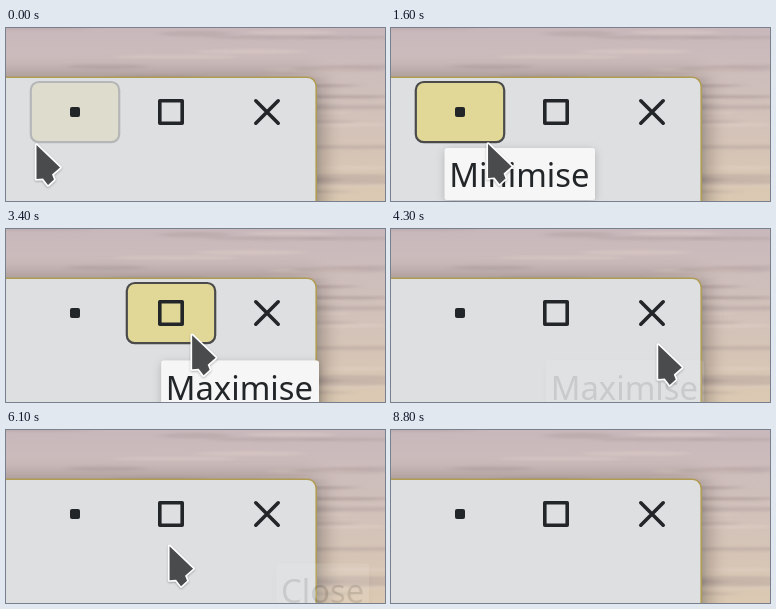
Animation of 379 by 173 pixels, one loop 9700 ms. Source, as an HTML page:

```html
<!DOCTYPE html>
<html lang="en">
<head>
<meta charset="utf-8">
<title>Window buttons</title>
<style>
  html, body { margin: 0; width: 100%; height: 100%; overflow: hidden; background: #cbbcbb; }
  svg { display: block; width: 100%; height: 100%; }
  text { font-family: "Noto Sans", "Open Sans", sans-serif; font-size: 32.8px; fill: #232629; }
</style>
</head>
<body>
<svg viewBox="0 0 379 173">
  <defs>
    <linearGradient id="sky" x1="0" y1="0" x2="0" y2="1">
      <stop offset="0" stop-color="#c8b8bc"/>
      <stop offset=".4" stop-color="#d0c0bb"/>
      <stop offset="1" stop-color="#dbc9b2"/>
    </linearGradient>
    <filter id="haze" x="-20%" y="-20%" width="140%" height="140%"><feGaussianBlur stdDeviation="5 1.2"/></filter>
    <filter id="soft" x="-30%" y="-50%" width="160%" height="200%"><feGaussianBlur stdDeviation="12"/></filter>
    <filter id="tipShadow" x="-20%" y="-40%" width="140%" height="180%">
      <feDropShadow dx="0" dy="2" stdDeviation="4" flood-color="#000" flood-opacity=".2"/>
    </filter>
    <filter id="cursorShadow" x="-50%" y="-50%" width="200%" height="200%">
      <feDropShadow dx="0" dy="1" stdDeviation="1" flood-color="#000" flood-opacity=".3"/>
    </filter>
  </defs>

  <rect width="379" height="173" fill="url(#sky)"/>
  <g id="streaks" filter="url(#haze)"></g>

  <rect x="-60" y="54" width="370" height="180" fill="#1c1614" opacity=".55" filter="url(#soft)"/>
  <rect x="-20" y="49.2" width="330.2" height="160" rx="9" fill="#dedfe1" stroke="#b09c52" stroke-width="1.6"/>

  <g id="buttons"></g>
  <g fill="none" stroke="#232629" stroke-width="3.6">
    <rect x="64" y="79" width="10" height="10" rx="2" fill="#232629" stroke="none"/>
    <rect x="153.8" y="72.8" width="22.4" height="22.4" stroke-linejoin="round"/>
    <path d="M249.8 72.8l22.4 22.4m0-22.4l-22.4 22.4" stroke-linecap="round"/>
  </g>
  <g id="tips"></g>
  <path id="cursor" d="M0 0V34L6.5 33.5L11.5 40L17.5 34.5L15.5 29.5L23.5 22.5Z" fill="#4a4c4e"
    stroke="#fff" stroke-width="3.2" stroke-linejoin="round" paint-order="stroke" filter="url(#cursorShadow)"/>
</svg>
<script>
const LOOP = 9700, STEP = 100, FALL = 300;
const YELLOW = '#e1d898', GOLD = '#e3d374', RED = '#e0858c';
const $ = id => document.getElementById(id);
const clamp = v => Math.min(1, Math.max(0, v));
const easeOut = p => 1 - (1 - p) ** 2;

function make(parent, tag, attrs) {
  const el = document.createElementNS('http://www.w3.org/2000/svg', tag);
  for (const key in attrs) el.setAttribute(key, attrs[key]);
  return parent.appendChild(el);
}

// Blurred streaks of the wallpaper
let seed = 7;
const random = () => (seed = seed * 16807 % 2147483647) / 2147483647;
for (let i = 0; i < 50; i++) {
  make($('streaks'), 'ellipse', {
    cx: random() * 379, cy: random() * 173, rx: 30 + random() * 50, ry: 1 + random() * 2,
    fill: i % 2 ? '#e4d5cc' : '#a99994', opacity: .35
  });
}

const faders = [];

// Fades in at `on` over `rise`, and out at `off`
function addFader(el, on, off, rise = 100) {
  faders.push({ el, on, off, rise });
}

function addButton(x, fill, on, off, rise) {
  const el = make($('buttons'), 'rect', {
    x, y: 54, width: 88.4, height: 60.2, rx: 8, fill, stroke: '#4a4a4b', 'stroke-width': 2.2
  });
  addFader(el, on, off, rise);
}

function addTip(label, x, y, width, on, off, rise) {
  const el = make($('tips'), 'g', {});
  make(el, 'rect', { x, y, width, height: 52, rx: 2.5, fill: '#f6f6f6', filter: 'url(#tipShadow)' });
  make(el, 'text', { x: x + 4.5, y: y + 39 }).textContent = label;
  addFader(el, on, off, rise);
}

addButton(24.8, YELLOW, -50, 1700, 350);
addButton(120.8, YELLOW, 2300, 3600);
addButton(216.8, RED, 4300, 5300);
addButton(120.8, GOLD, 6100, 8000, 300);

addTip('Minimise', 53.7, 120, 150.3, 800, 1900);
addTip('Maximise', 155.2, 131.5, 157.8, 2800, 4100);
addTip('Close', 270.5, 133.5, 92.5, 4300, 5900, 300);
addTip('Maximise', 166.2, 132.5, 157.8, 7100, 7300, 150);

// Each hop eases the pointer to a new rest; bow bends its path downwards
const rest = { x: 30.5, y: 117 };
const hops = [
  { from: 0, to: 800, x: 49, y: 98, bow: 0 },
  { from: 1300, to: 2400, x: 151, y: 109, bow: 17 },
  { from: 3100, to: 3500, x: 188.5, y: 109, bow: -4 },
  { from: 3600, to: 4400, x: 268.5, y: 111, bow: 13 },
  { from: 5200, to: 6200, x: 162.5, y: 111.5, bow: 15 },
  { from: 8000, to: 8500, x: 83, y: 122, bow: 0 },
  { from: 8600, to: 8700, x: 27, y: 115, bow: 0 }
];

function pointer(t) {
  let { x, y } = rest;
  for (const hop of hops) {
    const p = clamp((t - hop.from) / (hop.to - hop.from)), s = easeOut(p);
    x += (hop.x - x) * s;
    y += (hop.y - y) * s + hop.bow * Math.sin(Math.PI * p);
  }
  return { x, y };
}

function draw(time) {
  const t = Math.floor(time % LOOP / STEP) * STEP;
  for (const { el, on, off, rise } of faders) {
    const shown = easeOut(clamp((t - on) / rise)) * (1 - easeOut(clamp((t - off) / FALL)));
    el.setAttribute('opacity', shown);
  }
  const { x, y } = pointer(t);
  $('cursor').setAttribute('transform', `translate(${x} ${y})`);
  $('cursor').setAttribute('visibility', t < 8800 ? 'visible' : 'hidden');
}

const start = performance.now();
function tick() {
  draw(performance.now() - start);
  requestAnimationFrame(tick);
}
tick();
</script>
</body>
</html>
```
